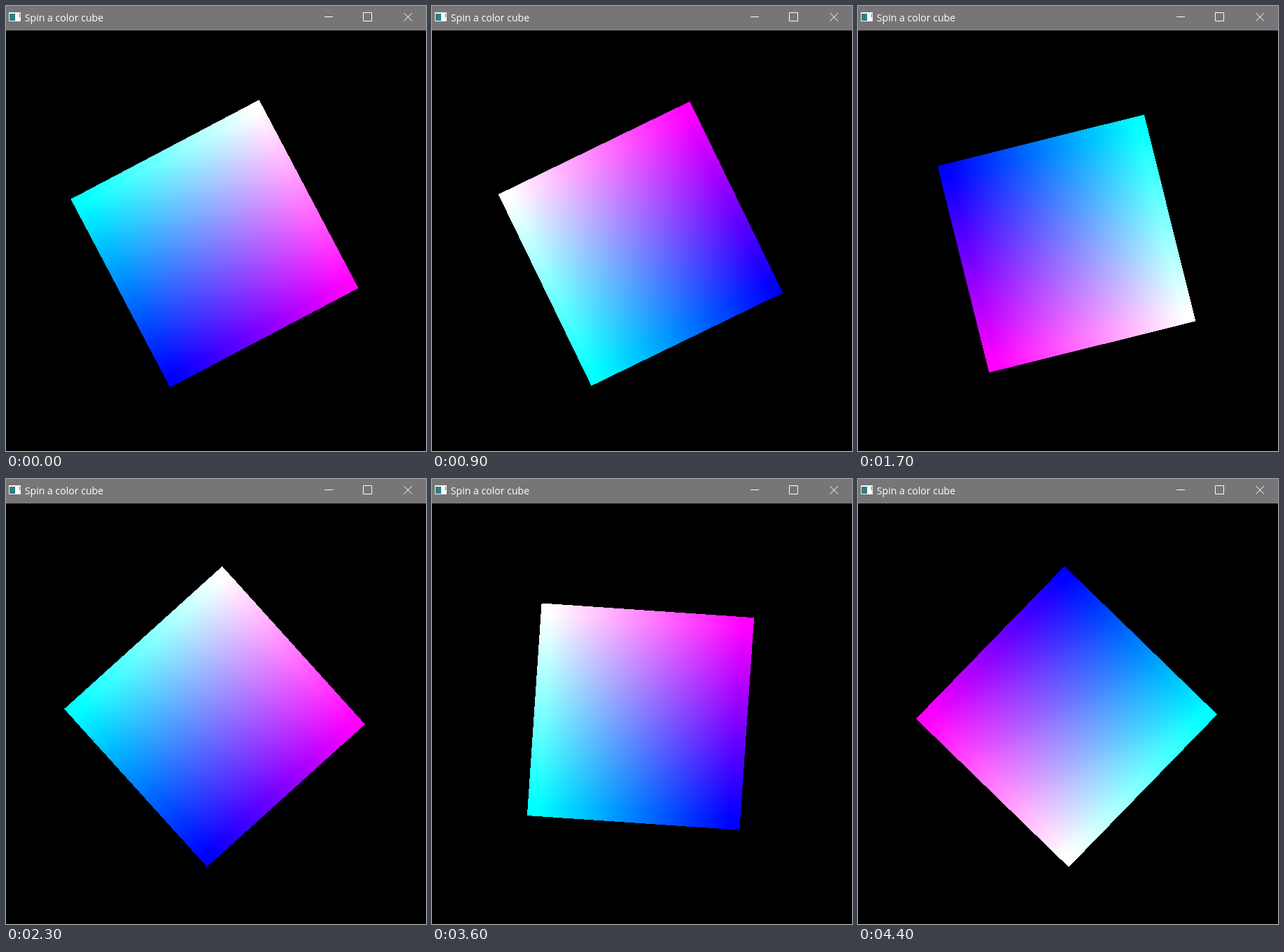
An HTML page that plays this animation: 600x636 px, repeating every 4500 ms.

```html
<!DOCTYPE html>
<html lang="en">
<head>
<meta charset="utf-8">
<title>Spin a color cube</title>
<style>
  html, body { margin: 0; width: 100%; height: 100%; overflow: hidden; background: #000; }
  svg { position: absolute; left: 0; top: 0; display: block; }
  text { font: 14.1px "Open Sans", "Noto Sans", sans-serif; fill: #fff; }
  #face rect { mix-blend-mode: screen; }
</style>
</head>
<body>
<svg width="600" height="636" viewBox="0 0 600 636">
  <defs>
    <linearGradient id="red">
      <stop offset=".05" stop-color="#000"/>
      <stop offset=".95" stop-color="#f00"/>
    </linearGradient>
    <linearGradient id="green" x1="0" y1="1" x2="0" y2="0">
      <stop offset=".05" stop-color="#000"/>
      <stop offset=".95" stop-color="#0f0"/>
    </linearGradient>
    <rect id="side" x="-152.1" y="-152.1" width="304.2" height="304.2"/>
  </defs>
  <rect width="600" height="636"/>

  <!-- Each color channel is one ramp; screened together they blend the corners. -->
  <g id="face" shape-rendering="crispEdges">
    <rect x="-152.1" y="-152.1" width="304.2" height="304.2" fill="#00f"/>
    <rect x="-152.1" y="-152.1" width="304.2" height="304.2" fill="url(#red)"/>
    <rect x="-152.1" y="-152.1" width="304.2" height="304.2" fill="url(#green)"/>
  </g>

  <rect width="600" height="35" fill="#787578"/>
  <g shape-rendering="crispEdges">
    <rect x="4" y="9" width="17" height="13" fill="#f4f4f4"/>
    <rect x="5" y="11" width="8" height="10" fill="#2f7f86"/>
    <rect x="14" y="11" width="4" height="10" fill="#fff"/>
    <rect x="19" y="11" width="1" height="5" fill="#777"/>
  </g>
  <text x="26.8" y="22">Spin a color cube</text>
  <g fill="none" stroke="#fff">
    <path d="M455 15.5h12M510.5 9.5h12v12h-12z"/>
    <path d="M568.5 10l11.5 11.5M580 10l-11.5 11.5"/>
  </g>
</svg>
<script>
const LOOP = 4500, STEP = 100;

// The spin speeds up and slows down: [step, clockwise turn of the face in degrees].
const TURNS = [[0, -27.8], [9, 244.1], [17, 436], [23, 677.9], [30, 889.9], [36, 993.9], [44, 1214.2]];

const face = document.getElementById("face");

function turnAt(step) {
  const i = Math.max(1, TURNS.findIndex(([s]) => s >= step));
  const [s0, a0] = TURNS[i - 1], [s1, a1] = TURNS[i];
  return a0 + (a1 - a0) * (step - s0) / (s1 - s0);
}

const start = performance.now();
function tick() {
  const step = Math.floor((performance.now() - start) % LOOP / STEP);
  face.setAttribute("transform", `translate(298 339.6) rotate(${turnAt(step)})`);
  requestAnimationFrame(tick);
}
tick();
</script>
</body>
</html>
```
